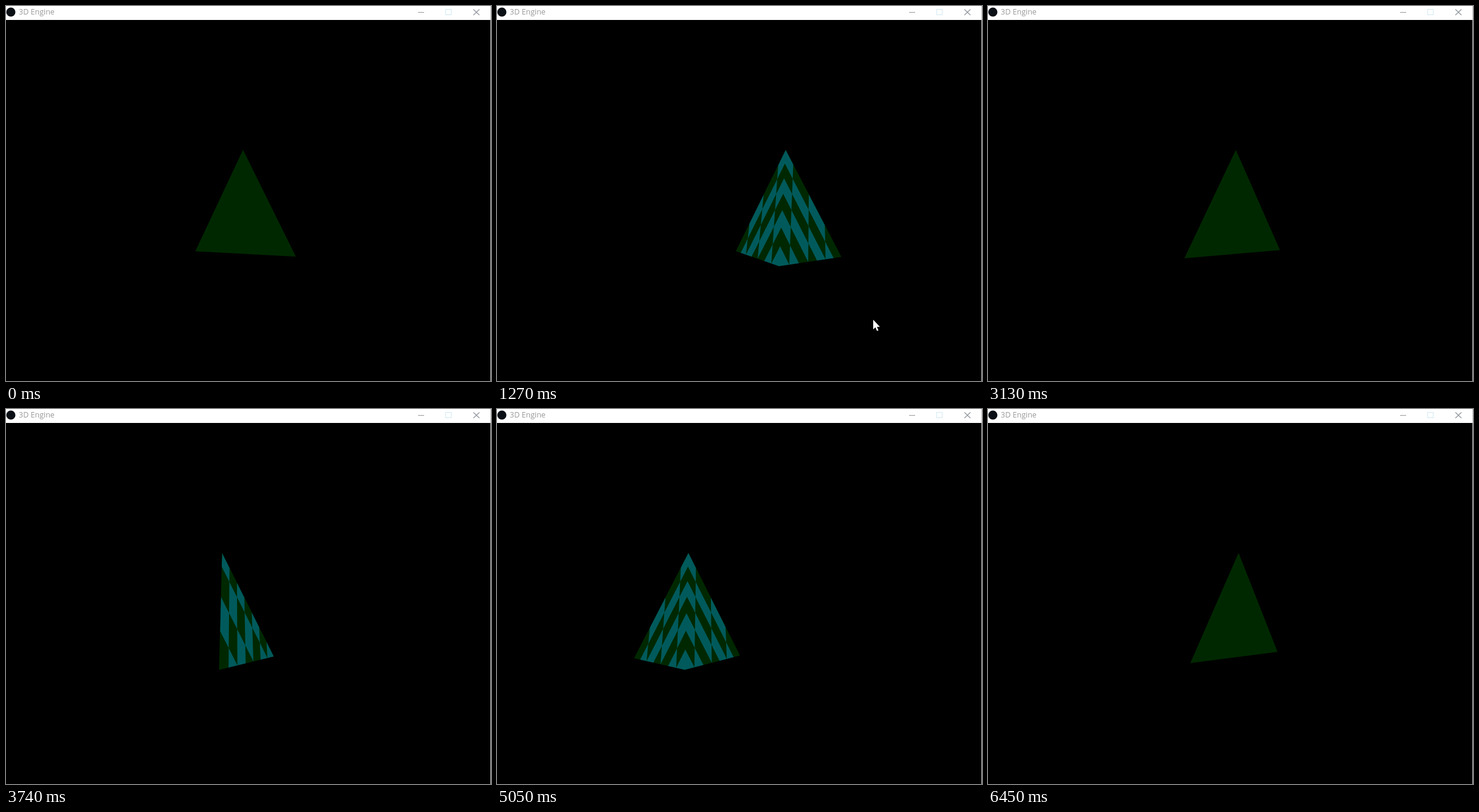
Animation, 798 px wide and 618 px high, one loop 6.52 s. Source, as an HTML page with a canvas:

```html
<!DOCTYPE html>
<html lang="en">
<head>
<meta charset="utf-8">
<title>3D Engine</title>
<style>
html, body { margin: 0; width: 100%; height: 100%; overflow: hidden; background: #000; }
canvas, svg { position: absolute; left: 0; top: 0; display: block; }
text { font: 12.5px "Open Sans", "Noto Sans", sans-serif; fill: #999; }
</style>
</head>
<body>
<canvas id="scene" width="798" height="618"></canvas>
<svg width="798" height="618" fill="none">
  <path id="cursor" fill="#fff" d="M0 0V16L3.6 12.6L6.2 18.5L8.6 17.5L6.1 11.8H11Z"/>
  <rect width="798" height="23" fill="#fff"/>
  <circle cx="8" cy="10" r="7.5" fill="#0b1016"/>
  <text x="21" y="14">3D Engine</text>
  <path d="M678 10.5H688" stroke="#999"/>
  <rect x="723.5" y="5.5" width="9" height="9" stroke="#d3e9f2"/>
  <path d="M769 5.5L779 15M779 5.5L769 15" stroke="#8f959c" stroke-width="1.2"/>
  <path d="M797.5 0V618" stroke="#c4c4c4"/>
</svg>
<script>
const ctx = document.getElementById('scene').getContext('2d');
const cursor = document.getElementById('cursor');
const LOOP = 6520, STEPS = 84, STEP = LOOP / STEPS;
const CELLS = 7, DARK = '#002800', TEAL = '#005a5c';
const FOCAL = 300 / Math.tan(35 * Math.PI / 180), CX = 397, CY = 322.8;

// Pyramid corners: left, apex, right, front
const CORNERS = [[-1, -1, 0], [0, 1, 0], [1, -1, 0], [0, -1, 1]];
const FACES = [[0, 1, 3], [3, 1, 2], [2, 1, 0]];

const ramp = (t, from, to) => Math.min(1, Math.max(0, (t - from) / (to - from)));
const project = ([x, y, z]) => [CX + x * FOCAL / z, CY - y * FOCAL / z];

function addPolygon(path, points) {
  points.forEach((p, i) => i ? path.lineTo(...p) : path.moveTo(...p));
  path.closePath();
}

function facesViewer([a, b, c]) {
  return (b[0] - a[0]) * (c[1] - a[1]) < (b[1] - a[1]) * (c[0] - a[0]);
}

// Checker squares of the face spanned by the edges apex-side and apex-front
function addChecks(path, apex, side, front) {
  const at = (b, c) => project(apex.map((v, k) =>
    v + ((side[k] - v) * b + (front[k] - v) * c) / CELLS));
  for (let i = 0; i < 4; i++) {
    for (let j = i % 2; j < CELLS; j += 2) {
      const b0 = Math.max(0, 2 * i - 1), b1 = 2 * i + 1;
      if (b0 + j >= CELLS) continue;
      addPolygon(path, [at(b0, j), at(b1, j), at(b1, j + 1), at(b0, j + 1)]);
    }
  }
}

// The sine of a steadily growing angle drives both the slide and the turn
function drawPyramid(step) {
  const angle = -4.7 + 4.36 * step + 0.0019 * step * step;
  const swing = Math.sin(angle * Math.PI / 180);
  const sin = Math.sin(swing * Math.PI), cos = Math.cos(swing * Math.PI);
  const pts = CORNERS.map(([x, y, z]) => [x * cos - z * sin + swing, y, x * sin + z * cos + 5]);
  const body = new Path2D(), checks = new Path2D();

  for (const face of FACES) {
    const flat = face.map(i => project(pts[i]));
    if (!facesViewer(flat)) continue;
    addPolygon(body, flat);
    if (face.includes(3)) addChecks(checks, pts[1], pts[face.includes(0) ? 0 : 2], pts[3]);
  }
  ctx.fillStyle = DARK;
  ctx.fill(body);
  ctx.save();
  ctx.clip(body);
  ctx.fillStyle = TEAL;
  ctx.fill(checks);
  ctx.restore();
}

// The pointer comes in from below, sways to the right and leaves
function drawPointer(t) {
  const enter = ramp(t, 450, 680), leave = ramp(t, 1430, 1820);
  const sway = Math.sin(ramp(t, 680, 1240) * Math.PI);
  const x = 600 + 19 * enter + 13 * sway + 77 * leave;
  const y = 596 - 79 * enter + 70 * leave;
  cursor.style.display = enter > 0 && leave < 1 ? '' : 'none';
  cursor.setAttribute('transform', `translate(${x} ${y})`);
}

function draw() {
  const step = Math.floor(performance.now() % LOOP / STEP + 0.1) % STEPS;
  ctx.fillStyle = '#000';
  ctx.fillRect(0, 0, 798, 618);
  drawPyramid(step);
  drawPointer(step * STEP);
  requestAnimationFrame(draw);
}
draw();
</script>
</body>
</html>
```
